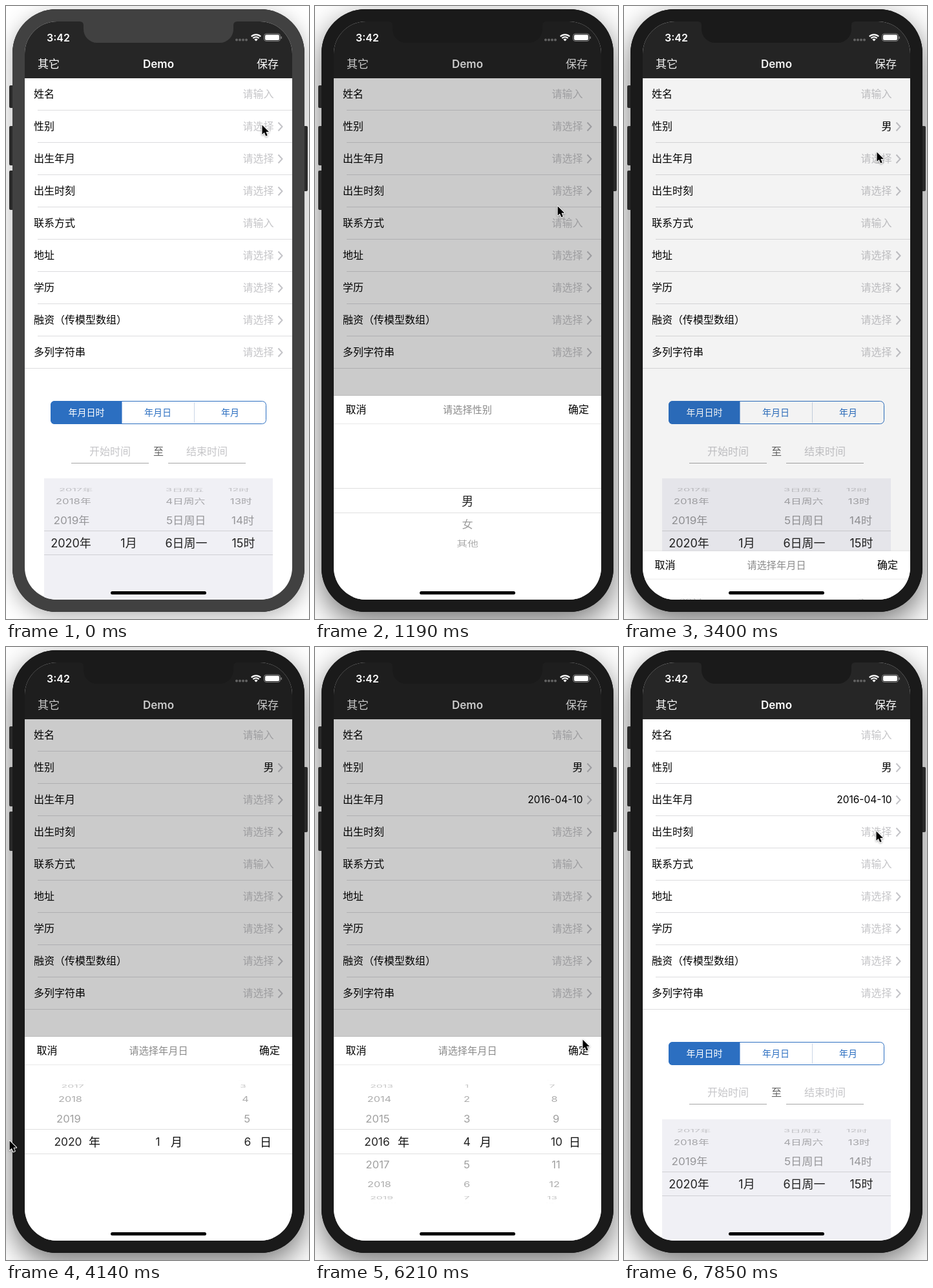
An HTML page with a canvas for the animation above (7990 ms loop, 469 by 950 pixels).

```html
<!DOCTYPE html>
<html lang="zh-CN">
<head>
<meta charset="utf-8">
<title>Demo</title>
<style>
  html, body { margin: 0; width: 100%; height: 100%; overflow: hidden; background: #fff; }
  canvas { display: block; width: 469px; height: 950px; }
</style>
</head>
<body>
<canvas></canvas>
<script>
const W = 469, H = 950, LOOP = 7990, STEP = LOOP / 54;
const MID = 236, LEFT = 29, RIGHT = 443, TOP = 24, BOTTOM = 920, SHEET = 316;
const FONT = 'Inter, "Noto Sans CJK SC", "Noto Sans CJK", sans-serif';
const BLUE = '#2c6fc1', HINT = '#c5c5c8', LINE = '#dcdcde';

const canvas = document.querySelector('canvas');
const ctx = canvas.getContext('2d');
const dpr = window.devicePixelRatio || 1;
canvas.width = W * dpr;
canvas.height = H * dpr;

const clamp = x => Math.min(1, Math.max(0, x));
const ease = x => (1 - Math.cos(Math.PI * clamp(x))) / 2;
const ramp = (t, start, length) => ease((t - start) / length);

// Pointer path: time, x, y
const pointerPath = [
  [1050, 396, 184], [1640, 304, 739], [2060, 396, 660], [2210, 404, 641], [2360, 409, 619],
  [2800, 409, 619], [3250, 391, 226], [3404, 391, 226], [3552, 300, 482], [3850, 60, 690],
  [4140, 4, 765], [4400, 98, 745], [4730, 100, 876], [5000, 235, 740], [5250, 236, 876],
  [5500, 374, 745], [5770, 376, 876], [5920, 390, 790], [6070, 402, 700], [6210, 414, 608],
  [6450, 414, 608], [6510, 414, 609], [6830, 414, 609], [6960, 408, 624], [7250, 408, 624],
  [7410, 437, 500], [7700, 390, 285]
];

function pointerAt(t) {
  const next = pointerPath.findIndex(p => p[0] > t);
  if (next === 0) return pointerPath[0].slice(1);
  if (next < 0) return pointerPath[pointerPath.length - 1].slice(1);
  const [t0, x0, y0] = pointerPath[next - 1], [t1, x1, y1] = pointerPath[next];
  const k = (t - t0) / (t1 - t0);
  return [x0 + (x1 - x0) * k, y0 + (y1 - y0) * k];
}

function text(str, x, y, size, color, align = 'left', weight = 400) {
  ctx.font = `${weight} ${size}px ${FONT}`;
  ctx.textAlign = align;
  ctx.fillStyle = color;
  ctx.fillText(str, x, y + size * 0.37);
}

function rect(x, y, w, h, color) {
  ctx.fillStyle = color;
  ctx.fillRect(x, y, w, h);
}

function roundPath(x, y, w, h, r) {
  ctx.beginPath();
  ctx.roundRect(x, y, w, h, r);
}

function round(x, y, w, h, r, color) {
  roundPath(x, y, w, h, r);
  ctx.fillStyle = color;
  ctx.fill();
}

// One picker column: labels on a cylinder, seen in slight perspective
function wheel(x, y, value, min, max, size, label = String, radius = 95, degrees = 22) {
  const first = Math.max(min, Math.ceil(value - 4.5)), last = Math.min(max, value + 4.5);
  for (let i = first; i <= last; i++) {
    const angle = (i - value) * degrees * Math.PI / 180, depth = Math.cos(angle);
    if (depth <= 0.02) continue;
    const selected = Math.abs(i - value) < 0.5;
    const scale = 1 / (1 + 0.09 * (1 - depth));
    ctx.save();
    ctx.translate(MID + (x - MID) * scale, y + radius * Math.sin(angle));
    ctx.scale(scale, depth);
    const color = selected ? '#222' : `rgba(0,0,0,${0.4 * depth ** 0.6})`;
    text(label(i), 0, 0, selected ? size : size * 0.96, color, 'center');
    ctx.restore();
  }
}

function drawPhone(active) {
  rect(0, 0, W, H, '#fff');
  ctx.save();
  ctx.shadowColor = `rgba(0,0,0,${active ? 0.55 : 0.3})`;
  ctx.shadowBlur = (active ? 46 : 32) * dpr;
  ctx.shadowOffsetY = (active ? 16 : 8) * dpr;
  round(10, 5, 452, 934, 68, '#1a1a1a');
  ctx.restore();
  for (const [x, y, h] of [[5, 123, 35], [5, 186, 61], [5, 255, 61], [460, 186, 101]])
    round(x, y, 7, h, 2, '#2a2a2a');
  round(10, 5, 452, 934, 68, active ? '#1a1a1a' : '#414141');
}

function drawForm(t) {
  rect(LEFT, TOP, RIGHT - LEFT, BOTTOM - TOP, '#fff');
  rect(LEFT, TOP, RIGHT - LEFT, 88, '#262626');
  text('其它', 49, 90, 17, '#fff');
  text('Demo', MID, 90, 17, '#fff', 'center', 600);
  text('保存', 422, 90, 17, '#fff', 'right');

  const gender = t > 2640 ? '男' : '';
  const date = t > 6060 ? '2016-04-10' : t > 5550 ? '2016-04-06' : t > 4930 ? '2016-01-06' : '';
  const labels = ['姓名', '性别', '出生年月', '出生时刻', '联系方式', '地址', '学历',
    '融资（传模型数组）', '多列字符串'];
  labels.forEach((label, i) => {
    const y = 136.5 + 50 * i, typed = i === 0 || i === 4;
    const value = i === 1 ? gender : i === 2 ? date : '';
    text(label, 43, y, 16, '#000');
    text(value || (typed ? '请输入' : '请选择'), 414.5, y, value === date && value ? 15.5 : 16,
      value ? '#000' : HINT, 'right');
    if (!typed) {
      ctx.beginPath();
      ctx.moveTo(421.5, y - 6);
      ctx.lineTo(427.5, y + 0.5);
      ctx.lineTo(421.5, y + 7);
      ctx.strokeStyle = '#c4c4c8';
      ctx.lineWidth = 2;
      ctx.stroke();
    }
    const x = i === labels.length - 1 ? LEFT : 49;
    rect(x, 161 + 50 * i, RIGHT - x, 1, LINE);
  });

  roundPath(69.5, 612.5, 333, 35, 6);
  ctx.strokeStyle = BLUE;
  ctx.lineWidth = 1;
  ctx.stroke();
  round(69, 612, 110.5, 36, [6, 0, 0, 6], BLUE);
  rect(291, 614, 1, 32, '#cbd6e6');
  text('年月日时', 124.5, 630, 14, '#fff', 'center');
  text('年月日', 235, 630, 14, BLUE, 'center');
  text('年月', 347, 630, 14, BLUE, 'center');

  text('开始时间', 161, 690, 16, HINT, 'center');
  text('至', MID, 690, 16, '#666', 'center');
  text('结束时间', 311, 690, 16, HINT, 'center');
  rect(101, 708, 120, 1, '#a6a6a6');
  rect(251, 708, 120, 1, '#a6a6a6');

  rect(59, 732, 354, 190, '#f0f0f5');
  rect(59, 813, 354, 1, '#d0d0d4');
  rect(59, 850, 354, 1, '#d0d0d4');
  const column = (x, value, min, label) =>
    wheel(x, 832, value, min, value, 18, label, 87.5, 23.5);
  column(100.5, 2020, 2000, n => n + '年');
  column(190, 1, 1, n => n + '月');
  column(279, 6, 1, n => n + '日周' + '日一二三四五六'[(n + 2) % 7]);
  column(367.5, 15, 0, n => n + '时');
}

function drawSheet(t, shown) {
  const top = BOTTOM - SHEET * shown, y = top + 163;
  const picksDate = t > 3100;
  rect(LEFT, top, RIGHT - LEFT, SHEET, '#fff');
  rect(LEFT, top - 1, RIGHT - LEFT, 1, 'rgba(0,0,0,.08)');
  rect(LEFT, top + 43, RIGHT - LEFT, 1, '#e9e9e9');
  text('取消', 47.5, top + 21.5, 16, '#000');
  text(picksDate ? '请选择年月日' : '请选择性别', MID, top + 21.5, 15.2, '#8a8a8a', 'center');
  text('确定', 424, top + 21.5, 16, '#000', 'right');
  rect(LEFT, top + 143, RIGHT - LEFT, 1, '#dfdfdf');
  rect(LEFT, top + 181, RIGHT - LEFT, 1, '#dfdfdf');

  if (!picksDate) {
    wheel(MID, y, 0, 0, 2, 18, i => ['男', '女', '其他'][i]);
    return;
  }
  const year = 2020 - 4 * ramp(t, 4380, 560);
  const month = 1 + 3 * ramp(t, 5020, 480);
  const day = 6 + 4 * ramp(t, 5560, 520);
  const past = year < 2019.5;
  wheel(96, y, year, 1990, 2020, 17.4);
  wheel(235, y, month, 1, past ? 12 : 1, 17.4);
  wheel(374, y, day, 1, past ? 30 : 6, 17.4);
  text('年', 137, y, 18, '#111', 'center');
  text('月', 264, y, 18, '#111', 'center');
  text('日', 402, y, 18, '#111', 'center');
}

function drawStatusBar(active) {
  ctx.fillStyle = active ? '#1a1a1a' : '#414141';
  ctx.beginPath();
  ctx.moveTo(114, 23);
  ctx.lineTo(114, 24);
  ctx.quadraticCurveTo(120, 24, 120, 30);
  ctx.arcTo(120, 57, 147, 57, 21);
  ctx.arcTo(352, 57, 352, 30, 21);
  ctx.lineTo(352, 30);
  ctx.quadraticCurveTo(352, 24, 358, 24);
  ctx.lineTo(358, 23);
  ctx.fill();

  text('3:42', 63, 49, 16, '#fff', 'left', 600);
  for (let i = 0; i < 4; i++) round(355 + 5 * i, 50.5, 4, 4, 2, '#636363');

  ctx.strokeStyle = ctx.fillStyle = '#fff';
  ctx.lineWidth = 2.2;
  for (const r of [10.2, 6.5]) {
    ctx.beginPath();
    ctx.arc(387, 54.5, r, -Math.PI * 0.75, -Math.PI * 0.25);
    ctx.stroke();
  }
  ctx.beginPath();
  ctx.moveTo(387, 54.5);
  ctx.arc(387, 54.5, 3.7, -Math.PI * 0.75, -Math.PI * 0.25);
  ctx.fill();

  roundPath(399.5, 43, 25, 11.5, 3.5);
  ctx.strokeStyle = '#858585';
  ctx.lineWidth = 1;
  ctx.stroke();
  round(401, 44.5, 22, 8.5, 2, '#fff');
  round(425.5, 47, 1.5, 4, 1, '#858585');
}

function drawPointer(x, y) {
  ctx.save();
  ctx.translate(x + 0.5, y + 0.5);
  ctx.beginPath();
  for (const [px, py] of [[0, 0], [0, 14.5], [3.3, 11.6], [5.7, 17], [8.2, 16], [5.9, 10.6], [10.5, 10.4]])
    ctx.lineTo(px, py);
  ctx.closePath();
  ctx.lineWidth = 2;
  ctx.lineJoin = 'round';
  ctx.strokeStyle = '#fff';
  ctx.shadowColor = 'rgba(0,0,0,.35)';
  ctx.shadowBlur = 3 * dpr;
  ctx.shadowOffsetY = dpr;
  ctx.stroke();
  ctx.shadowColor = 'transparent';
  ctx.fillStyle = '#000';
  ctx.fill();
  ctx.restore();
}

function draw(t) {
  const active = t > 100;
  const shown = ramp(t, 330, 250) - ramp(t, 2640, 250) + ramp(t, 3322, 250) - ramp(t, 7220, 250);
  ctx.setTransform(dpr, 0, 0, dpr, 0, 0);
  drawPhone(active);

  ctx.save();
  roundPath(LEFT, TOP, RIGHT - LEFT, BOTTOM - TOP, 50);
  ctx.clip();
  drawForm(t);
  if (shown > 0.001) {
    rect(LEFT, TOP, RIGHT - LEFT, BOTTOM - TOP, `rgba(0,0,0,${0.204 * shown})`);
    drawSheet(t, shown);
  }
  ctx.restore();

  drawStatusBar(active);
  round(162, 907, 148, 5, 2.5, '#000');
  drawPointer(...pointerAt(t));
}

function tick(now) {
  const t = now % LOOP;
  draw(Math.min(53, Math.floor((t + 15) / STEP)) * STEP);
  requestAnimationFrame(tick);
}
requestAnimationFrame(tick);
</script>
</body>
</html>
```
